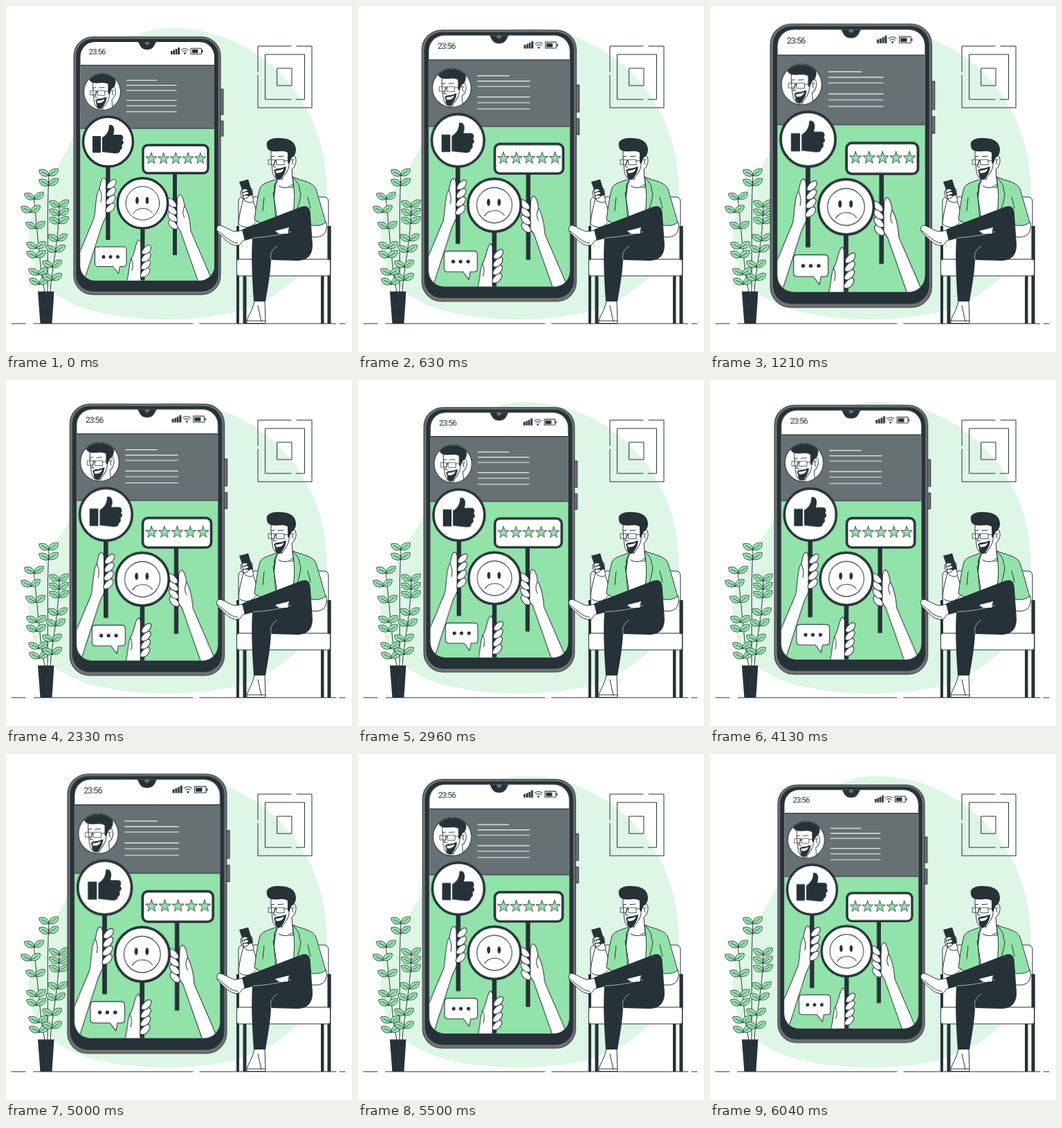
These frames come from a looping animation (500x500 px, 6.08 s). An HTML page:

```html
<!DOCTYPE html>
<html lang="en">
<head>
<meta charset="utf-8">
<title>Customer feedback</title>
<style>
  html, body { margin: 0; width: 100%; height: 100%; overflow: hidden; background: #fff; }
  svg { display: block; width: 100vw; height: 100vh; }
  .w { fill: #fff; }
  .g { fill: #92e3a9; }
  .d { fill: #263238; }
  .n { fill: none; }
  .metal { fill: #737373; }
  .s { stroke: #263238; stroke-width: 1; stroke-linecap: round; stroke-linejoin: round; }
  .thin { stroke-width: .8; }
  .white { fill: none; stroke: #fff; stroke-width: 1; }
  .bold { stroke: #263238; stroke-width: 3.4; }
  .clock { font: 11.5px Roboto, "Liberation Sans", sans-serif; letter-spacing: -.9px; }
  #phone { transform-origin: 206px 231px; animation: pulse 6080ms linear infinite; }
  @keyframes pulse {
    0%, 59.21%, 99.2%, 100% { transform: scale(1); }
    19.74%, 78.95% { transform: scale(1.1); }
  }
</style>
</head>
<body>
<svg viewBox="0 0 500 500">
  <defs>
    <clipPath id="screen"><rect x="107.5" y="52" width="193.5" height="344.5" rx="21"/></clipPath>
    <clipPath id="disc"><circle cx="139" cy="124" r="26"/></clipPath>
    <path id="leaf" class="g s thin" d="M0 0C-1-7 6-12 14-10C15-3 8 3 0 0ZM0 0L10-7"/>
    <path id="star" class="g s thin" d="M0-8.4L2-2.6L8-2.5L3.2 1.2L5 7L0 3.5L-5 7L-3.2 1.2L-8-2.5L-2-2.6Z"/>
    <path id="finger" class="w s" d="M-6 3C-5-1 1-7 5-6.500C9-5 7 1 3 4.500C0 7 -4 7.500 -6 6Z"/>
    <g id="head">
      <path class="w s" d="M383.500 207C382 217 384 228 385 238C386 246 390 251 395 250.500L399 249L398 262H415L413 236C419 232 421 221 417 217C414 216 412 220 411 222L408 205Z"/>
      <path class="d" d="M377 202C375 194 384 190 396 191C408 191 418 195 419 207C419 213 417 216 415 217.500C412 218 411 223 409.500 229L407 226V212C401 208 393 211 386 210C380 210 377 206 377 202Z"/>
      <path class="d" d="M387 237.500C391 233 396 236 401 233L405 232C404.500 239 401 246 396 250.500C391 251 388 247 389 243C388 241 388 239 387 237.500Z"/>
      <path class="w" d="M389.500 237.500Q395 238.500 401.500 235Q400 242 390.500 241.500Z"/>
      <path class="n s" d="M390 222L386 232L390 233M383 218L388 217M393 217.500L401 217M416 221Q412 225 415 229M409 229C409 236 405 242 399 249"/>
      <path class="n s thin" d="M379.500 222H388V229H379.500ZM391 222H402V229.500H391ZM388 224H391M402 224L414 222"/>
    </g>
  </defs>

  <path fill="#def6e5" d="M240 32C330 32 400 85 435 150C462 200 472 265 456 330C442 383 395 423 340 440C270 460 170 456 110 436C58 418 30 380 33 325C35 275 76 240 97 190C115 140 135 32 240 32Z"/>

  <g class="n s">
    <path d="M412 58H364V95M364 100V147H442V58H420"/>
    <path d="M412 135H374.5V70H431.5V135H419M392 90H413V115H392Z"/>
    <path d="M8 459H28M40 459H270M280 459H477M482 459H490"/>
  </g>

  <g id="plant">
    <path class="n s" d="M60 413C61 360 59 300 62 243M56 413C49 380 46 330 40 276M64 413C66 380 76 340 77 290"/>
    <path class="d" d="M46 412.5H69.5L66.5 459H49.5Z"/>
  </g>

  <g id="phone">
    <path class="metal s" d="M309 120H314V157H309ZM309 166H314V188H309Z"/>
    <rect x="98" y="44.7" width="212" height="372.3" rx="27" class="metal s"/>
    <rect x="101.300" y="47.500" width="205.500" height="365" rx="24" class="d"/>
    <g clip-path="url(#screen)">
      <path class="w" d="M107 51H302V397H107Z"/>
      <path class="g" d="M107 177H302V397H107Z"/>
      <path fill="#677073" class="s" d="M106 85.5H303V177H106Z"/>
      <path class="d" d="M189 51C194 52 192 63 204 63C216 63 214 52 219 51Z"/>
      <circle cx="204" cy="53" r="3" class="metal"/>
      <text class="d clock" x="119.5" y="70">23:56</text>

      <path class="d" d="M238 65H240.6V70H238ZM241.4 63.5H244V70H241.4ZM244.8 62H247.4V70H244.8ZM248.2 60H251V70H248.2Z"/>
      <path class="n s" d="M253.5 63.5Q258.5 59.5 263.5 63.5M255.2 66Q258.5 63.2 261.8 66"/>
      <circle class="d" cx="258.5" cy="68.5" r="1.4"/>
      <path class="n s" d="M267.5 61.2H282.5V69.5H267.5Z"/>
      <path class="d" d="M269 62.8H277.5V68H269ZM283 63.8H284.7V67H283Z"/>

      <circle class="w s" cx="139" cy="124" r="26.5"/>
      <g clip-path="url(#disc)"><use href="#head" transform="translate(-227 -82) scale(.92)"/></g>
      <path class="white" d="M174 107.3H218M174 114.6H246.5M174 122H246.5M174 136.4H246.5M174 144.2H246.5M174 152.8H246.5"/>

      <!-- arms and thumbs -->
      <path class="w s" d="M104 362L127 307C130 298 129 271 135 264C137 255 138 246 143 249C146 252 144 259 145 264V303L139 316L112 400H104Z"/>
      <path class="w s" d="M299 399L267 325C266 312 264 299 258 289C257 280 254 271 250 273C246 276 248 285 247 290V318L252 325L278 399Z"/>
      <path class="w s" d="M174 400C178 388 177 375 181 365C187 357 187 340 192 338C197 339 194 350 196 356V400Z"/>
      <path class="n s" d="M135 264C138 271 139 276 137 283M258 289C255 296 255 301 258 306M181 365C184 371 184 376 182 382"/>

      <path class="d" d="M144.3 231H150.5V338H144.3ZM241 240H247V360H241ZM194.3 320H200.5V398H194.3Z"/>

      <g id="fingers"></g>

      <circle class="w bold" cx="147.5" cy="196" r="36"/>
      <path class="d" d="M125 188H137V212H125ZM139 190C146 186 149 180 149 172C156 170 158 178 155 186H166C170 187 170 192 168 194C171 196 170 200 167 201C169 204 167 208 165 208C165 212 162 213 158 213L139 211Z"/>
      <rect class="w bold" x="198" y="201" width="94" height="40.5" rx="7"/>
      <g id="stars"></g>
      <circle class="w bold" cx="197.5" cy="285" r="36.3"/>
      <circle class="n s" cx="197.5" cy="285" r="24.3"/>
      <ellipse class="d" cx="189.5" cy="281" rx="2.3" ry="5"/>
      <ellipse class="d" cx="204" cy="281" rx="2.3" ry="5"/>
      <path class="n s" d="M184 300C189 290 206 290 211 299"/>

      <path class="w s" d="M133 348H169.500Q174 348 174 352.500V372Q174 376.500 169.500 376.500H164.500L162.500 387L154.500 376.500H133Q128.500 376.500 128.500 372V352.500Q128.500 348 133 348Z"/>
      <path class="n" stroke="#263238" stroke-width="5" stroke-linecap="round" d="M141 362.500h.01M151 362.500h.01M161.500 362.500h.01"/>
    </g>
  </g>

  <g id="chair">
    <path class="d" d="M333 318H337V459H333ZM342.500 388H347.500V459H342.500ZM455 388H459.500V459H455ZM464.500 318H469.500V459H464.500Z"/>
    <path class="w s" d="M336 366V283Q336 276 343 276H459Q466 276 466 283V366Z"/>
    <path class="w s" d="M336 366H466Q468.500 366 468.500 369V387Q468.500 390 466 390H336Q333.500 390 333.500 387V369Q333.500 366 336 366Z"/>
    <path class="d" d="M333 318H337V366H333ZM464.500 318H469.500V366H464.500Z"/>
  </g>

  <g id="man">
    <path class="w s" d="M343 279C340 290 337 302 336 314C342 323 358 322 365 306L358 284L353 273Z"/>
    <path class="w s" d="M391 251C397 247 409 247 416 248L421 320H382Z"/>
    <path class="g s" d="M393 249C384 254 372 254 367 263C363 277 361 294 359 309L369 314L374 322H391C390 300 386 281 388 264Z"/>
    <path class="w s" d="M463 313C465 326 460 334 447 334L396 331C388 330 386 325 394 322L441 314Z"/>
    <path class="g s" d="M414 247C428 253 444 254 448 265C453 281 458 299 462 313C456 317 448 318 442 317L438 312L413 314C416 294 419 274 414 247Z"/>
    <path class="n s" d="M393 249C388 257 386 262 389 266L386 270C388 285 391 295 391 305M414 247C422 255 425 261 424 266L426 270C425 284 420 296 416 308M436 276L440 292M373 277L371 296"/>
    <use href="#head"/>
    <path class="w" d="M394 260Q406 268 415 258L413 250L399 251Z"/>
    <path class="n s" d="M394 260Q406 267 415 257"/>

    <path class="w s" d="M359 426H374L375 458.500H348C347 450 356 443 359 426ZM349 455H375M364 433L369 456"/>
    <path class="w s" d="M343 324L331 326C322 324 314 317 308 317C303 318 304 326 308 329C315 335 323 346 333 346C341 346 338 340 345 338ZM306 325C316 332 324 342 335 343"/>
    <path class="d" d="M341 323L427 290C436 287 440 292 440 302L443 345C443 361 435 368 420 368L383 367C382 388 378 409 375 427H358C356 398 354 364 356 336L345 339Z"/>
    <path class="w" d="M389 325L409 320L407 329H394Z"/>
    <path class="white" style="stroke-width:.6" d="M357 335C376 334 395 331 412 326M383 367C381 358 385 351 392 347"/>

    <path class="w s" d="M343 279C338 273 338 266 343 264L354 263C358 266 354 273 358 280C358 285 349 286 343 279Z"/>
    <path class="d" d="M337 254L350 250.500L357 273L345 277Z"/>
    <path class="w s" d="M341 266C344 263 350 264 349 267L342 270C348 267 352 269 350 272L343 274C348 272 352 274 349 277L344 279Z"/>
  </g>
</svg>
<script>
  const $ = id => document.getElementById(id);
  const use = (id, x, y, more = "") =>
    `<use href="#${id}" transform="translate(${x} ${y}) ${more}"/>`;

  // Each node of a stem carries one leaf on either side.
  const nodes = [
    [62, 245], [62, 259],
    [41, 279], [36, 298], [43, 321], [44, 350], [44, 363], [47, 388], [48, 402],
    [77, 290], [77, 302], [77, 314], [75, 339], [72, 355], [67, 377], [67, 396]
  ];
  $("plant").insertAdjacentHTML("beforeend", nodes.map(([x, y]) =>
    use("leaf", x, y, "rotate(-6) scale(-.95 .95)") + use("leaf", x, y, "scale(.95)")
  ).join(""));

  $("stars").innerHTML = [0, 1, 2, 3, 4].map(i => use("star", 210 + 17.7 * i, 220.5)).join("");

  const grip = (x, y, step, side) => [3, 2, 1, 0].map(i =>
    use("finger", x - side * i * .6, y + step * i, `scale(${side} 1)`)).join("");
  $("fingers").innerHTML =
    grip(152, 257, 11.5, 1) + grip(240, 284, 10.5, -1) + grip(202.5, 352, 11, 1);
</script>
</body>
</html>
```
